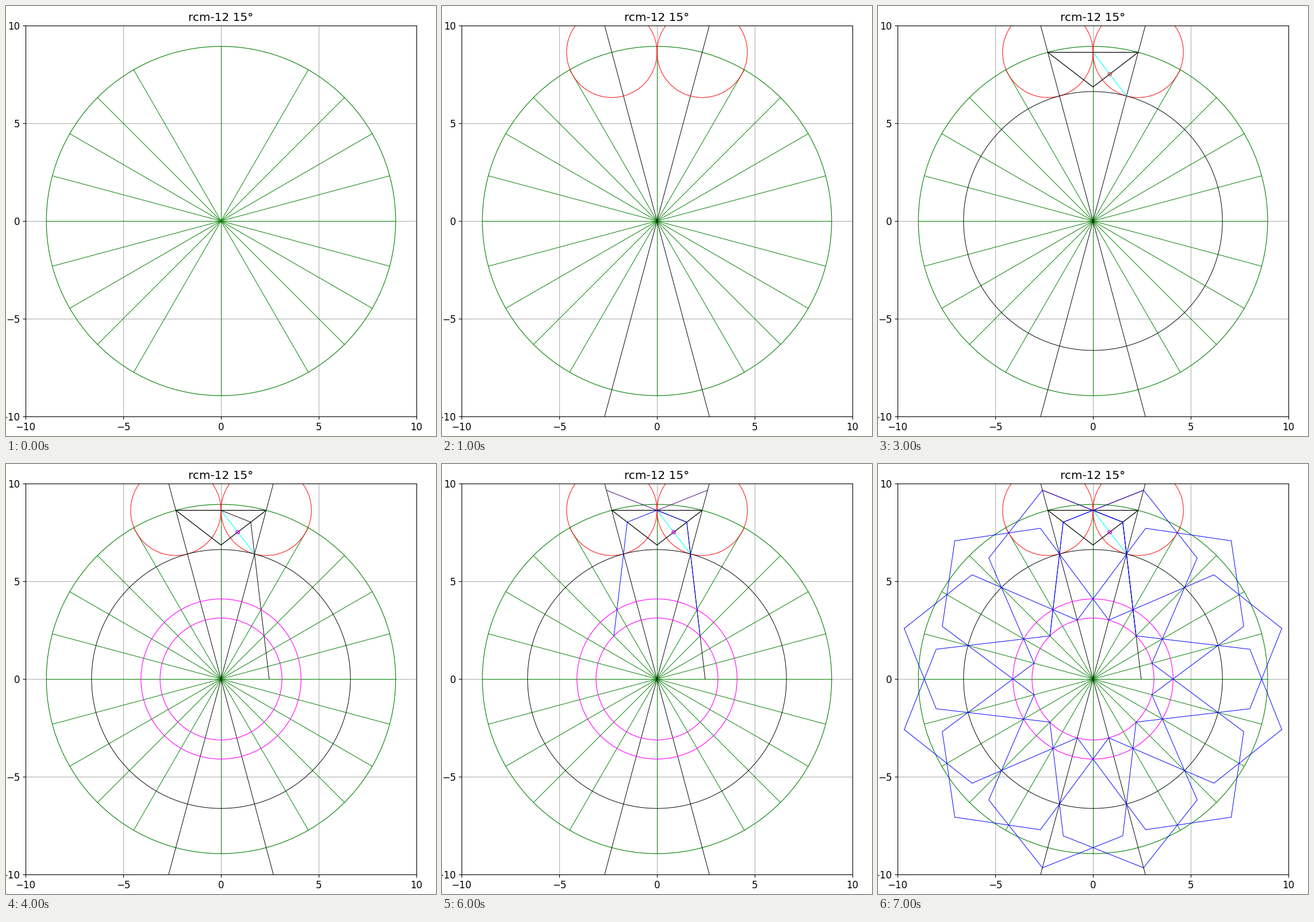
Animation, 748 px wide and 748 px high, one loop 8 s. Source, as a matplotlib script:

```python
import numpy as np
import matplotlib.pyplot as plt
from matplotlib.animation import FuncAnimation
from matplotlib.patches import Circle

SIZE, DPI, MARGIN = 748, 100, 34
STEPS, STEP_MS = 8, 1000
THIN = 0.7

plt.rcParams.update({"font.family": "DejaVu Sans", "font.size": 12})


def polar(r, deg):
    a = np.radians(deg)
    return np.array([r * np.cos(a), r * np.sin(a)])


def rotate(points, deg):
    a = np.radians(deg)
    c, s = np.cos(a), np.sin(a)
    return np.asarray(points) @ np.array([[c, s], [-s, c]])


def mirror(points):
    return np.asarray(points) * [-1, 1]


# Construction of one petal; half a sector is 15 degrees.
HALF = np.radians(15)
TOP = np.array([0, 8.63])
SMALL = TOP[1] * np.tan(HALF)
OUTER = TOP[1] / np.cos(HALF)
MID = OUTER - SMALL

center = polar(OUTER, 75)
touch = polar(MID, 75)
tip = polar(10, 75)
half_chord = (TOP + touch) / 2
apex = np.array([0, TOP[1] - SMALL * np.tan(np.radians(37.5))])

slope = (tip[1] - TOP[1]) / tip[0]
bend = 52.5 - np.degrees(np.arctan(slope))
reach = np.linalg.norm(touch - TOP) / 2 / np.cos(np.radians(bend))
knee = TOP + polar(reach, bend - 52.5)

run = (touch[0] - knee[0]) / (knee[1] - touch[1])
foot = np.array([touch[0] + run * touch[1], 0])
inner = foot[0] / (1 + run) * np.ones(2)
cross_x = foot[0] / (1 + run * np.sqrt(3))

leg = np.array([inner, touch, knee, TOP])
strand = np.vstack([leg, mirror([tip])])

fig = plt.figure(figsize=(SIZE / DPI, SIZE / DPI), dpi=DPI, facecolor="white")
edge = MARGIN / SIZE
ax = fig.add_axes([edge, edge, 1 - 2 * edge, 1 - 2 * edge])
ax.set(xlim=(-10, 10), ylim=(-10, 10))
ax.set_xticks(range(-10, 11, 5))
ax.set_yticks(range(-10, 11, 5))
ax.grid(True)
ax.set_title("rcm-12 15°")

parts = []


def line(step, points, color, lw=THIN, z=2):
    x, y = np.asarray(points).T
    parts.append((step, ax.plot(x, y, color=color, lw=lw, zorder=z)[0]))


def circle(step, xy, r, color, lw=THIN):
    ring = Circle(xy, r, fill=False, ec=color, lw=lw, zorder=2)
    parts.append((step, ax.add_patch(ring)))


# 0: outer circle and spokes
circle(0, (0, 0), OUTER, "green", 0.8)
for deg in range(0, 180, 15):
    if deg not in (75, 105):
        line(0, [polar(OUTER, deg), -polar(OUTER, deg)], "green")

# 1: two touching circles and their axes
for side in (1, -1):
    x = 10 * np.tan(HALF) * side
    line(1, [(-x, -10), (x, 10)], "black")
    circle(1, center * [side, 1], SMALL, "red")

# 2: circle through the near points
circle(2, (0, 0), MID, "black")

# 3: chord, its midpoint and the bisectors
line(3, [TOP, touch], "cyan", 0.8)
line(3, [mirror(center), center, apex, mirror(center)], "black", 0.9)
circle(3, half_chord, 0.09, "red")

# 4: guide line and inner circles
circle(4, half_chord, 0.09, "magenta", 0.9)
line(4, [TOP, knee, foot], "black")
circle(4, (0, 0), np.hypot(*inner), "magenta", 0.8)
circle(4, (0, 0), 2 * cross_x, "magenta", 0.8)

# 5: first pair of legs
line(5, leg, "blue")
line(5, mirror(leg), "blue")

# 6: extensions to the tips
line(6, [tip, TOP, mirror(tip)], "indigo", z=2.5)

# 7: the whole rosette
for k in range(12):
    for path in (strand, mirror(strand)):
        line(7, rotate(path, 30 * k), "blue")


def update(i):
    for step, artist in parts:
        artist.set_visible(step <= i)
    return [artist for _, artist in parts]


anim = FuncAnimation(fig, update, frames=STEPS, interval=STEP_MS,
                     init_func=lambda: update(0), repeat=True, repeat_delay=0)
plt.show()
```
